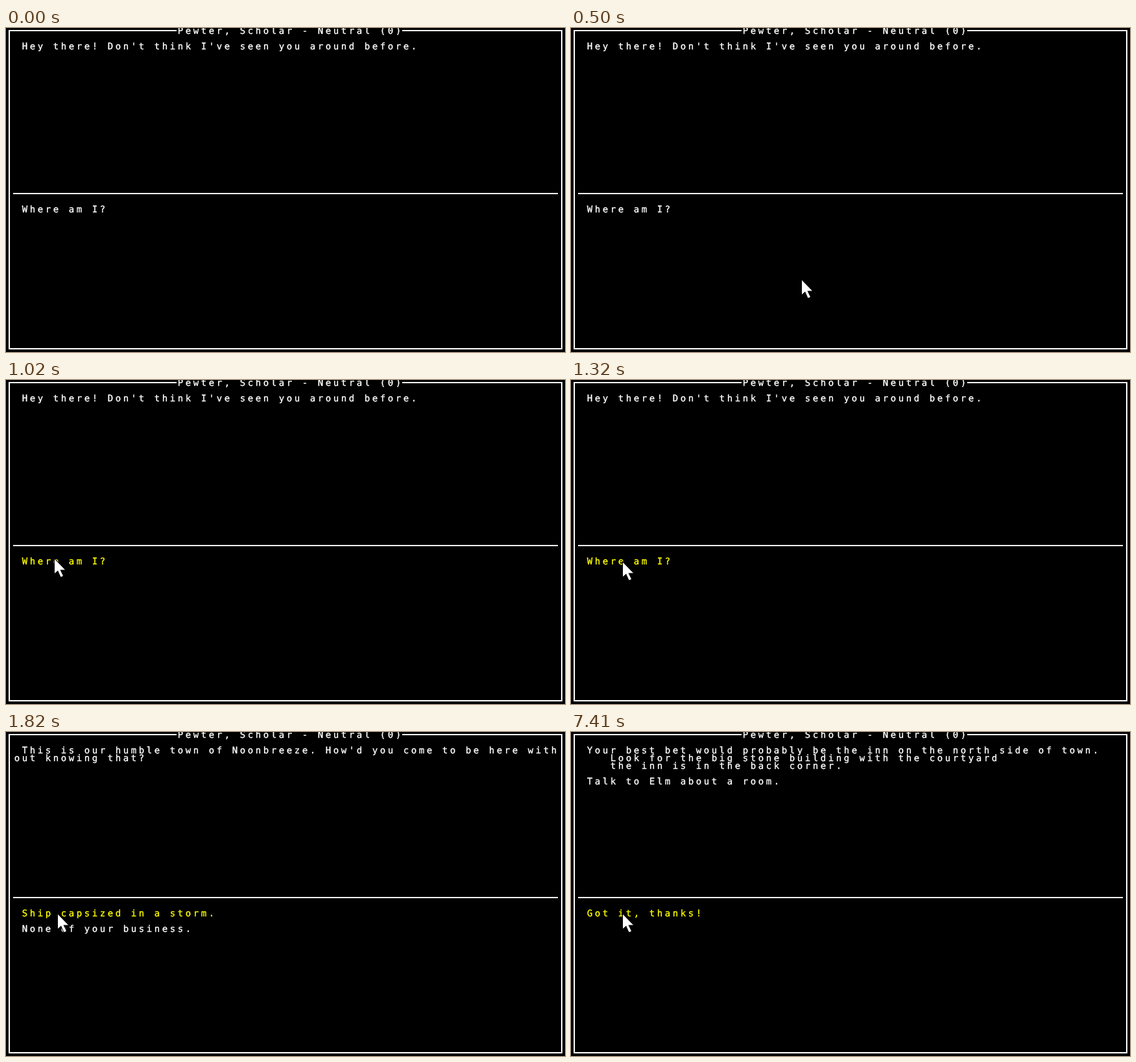
Write an HTML page that moves like this. It is 862x501 px and loops after 8000 ms.

```html
<!DOCTYPE html>
<html lang="en">
<head>
<meta charset="utf-8">
<title>Dialogue</title>
<style>
  html, body { margin: 0; width: 100%; height: 100%; overflow: hidden; background: #000; }
  svg { display: block; width: 862px; height: 501px; }
  text {
    font: 14px "DejaVu Sans Mono", monospace;
    font-variant-ligatures: none;
    text-anchor: middle;
    text-rendering: geometricPrecision;
    fill: currentColor;
    stroke: currentColor;
    stroke-width: .35;
  }
  svg { color: #fff; }
  .hover { color: #ff0; }
</style>
</head>
<body>
<svg id="stage" viewBox="0 0 862 501">
  <path d="M263 4H5V496H857V4H611M11 256H851" fill="none" stroke="#fff" stroke-width="2" shape-rendering="crispEdges"/>
  <circle id="click" cx="79" cy="280" r="12" fill="#808000"/>
  <g id="words"></g>
  <path id="cursor" d="M0 0V22L5 17.5L9.5 27.5L13 26L8.5 16.5H16Z" fill="#fff" stroke="#000" stroke-width="2" paint-order="stroke"/>
</svg>
<script>
const NS = 'http://www.w3.org/2000/svg';
const LOOP = 8000, CELL = 12;
const $ = id => document.getElementById(id);

// Each line: left edge, vertical middle, text. The first option follows the pointer.
const scenes = [
  { at: 0,
    lines: [[24, 28, "Hey there! Don't think I've seen you around before."]],
    options: ['Where am I?'] },
  { at: 1820,
    lines: [[24, 28, "This is our humble town of Noonbreeze. How'd you come to be here with"],
            [12, 40, 'out knowing that?']],
    options: ['Ship capsized in a storm.', 'None of your business.'] },
  { at: 4380,
    lines: [[24, 28, "You were sailing in that storm? It was bad even here in town, you're"],
            [12, 40, 'lucky to be alive!']],
    options: ['Is there somewhere I can stay here?'] },
  { at: 7410,
    lines: [[24, 28, 'Your best bet would probably be the inn on the north side of town.'],
            [60, 40, 'Look for the big stone building with the courtyard'],
            [60, 52, 'the inn is in the back corner.'],
            [24, 76, 'Talk to Elm about a room.']],
    options: ['Got it, thanks!'] }
];

// Pointer steps: time, x, y, hovering
const pointer = [
  [100, 757, 482, 0], [200, 700, 468, 0], [300, 606, 446, 0], [400, 484, 419, 0],
  [500, 356, 390, 0], [620, 200, 330, 0], [720, 98, 283, 1], [820, 75, 266, 0],
  [920, 75, 271, 0], [1020, 75, 277, 1], [1220, 77, 279, 1], [1320, 80, 282, 1]
].map(([at, x, y, hover]) => ({ at, x, y, hover }));

function addText(parent, x, y, str) {
  const node = document.createElementNS(NS, 'text');
  node.setAttribute('x', [...str].map((_, i) => x + 5 + i * CELL).join(' '));
  node.setAttribute('y', y + 5);
  node.textContent = str;
  parent.append(node);
  return node;
}

addText($('words'), 264, 4, 'Pewter, Scholar - Neutral (0)');
for (const scene of scenes) {
  scene.group = document.createElementNS(NS, 'g');
  scene.lines.forEach(line => addText(scene.group, ...line));
  const options = scene.options.map((str, i) => addText(scene.group, 24, 280 + i * 24, str));
  scene.choice = options[0];
  $('words').append(scene.group);
}

const show = (node, on) => node.setAttribute('visibility', on ? 'visible' : 'hidden');
const current = (steps, t) => steps.findLast(step => step.at <= t);
const start = performance.now();

function draw() {
  const t = (performance.now() - start) % LOOP;
  const scene = current(scenes, t);
  const step = current(pointer, t);
  scenes.forEach(s => show(s.group, s === scene));
  scene.choice.classList.toggle('hover', !!step?.hover);
  show($('click'), t >= 1720 && t < 1820);
  show($('cursor'), step);
  if (step) $('cursor').setAttribute('transform', `translate(${step.x} ${step.y})`);
  requestAnimationFrame(draw);
}
draw();
</script>
</body>
</html>
```
